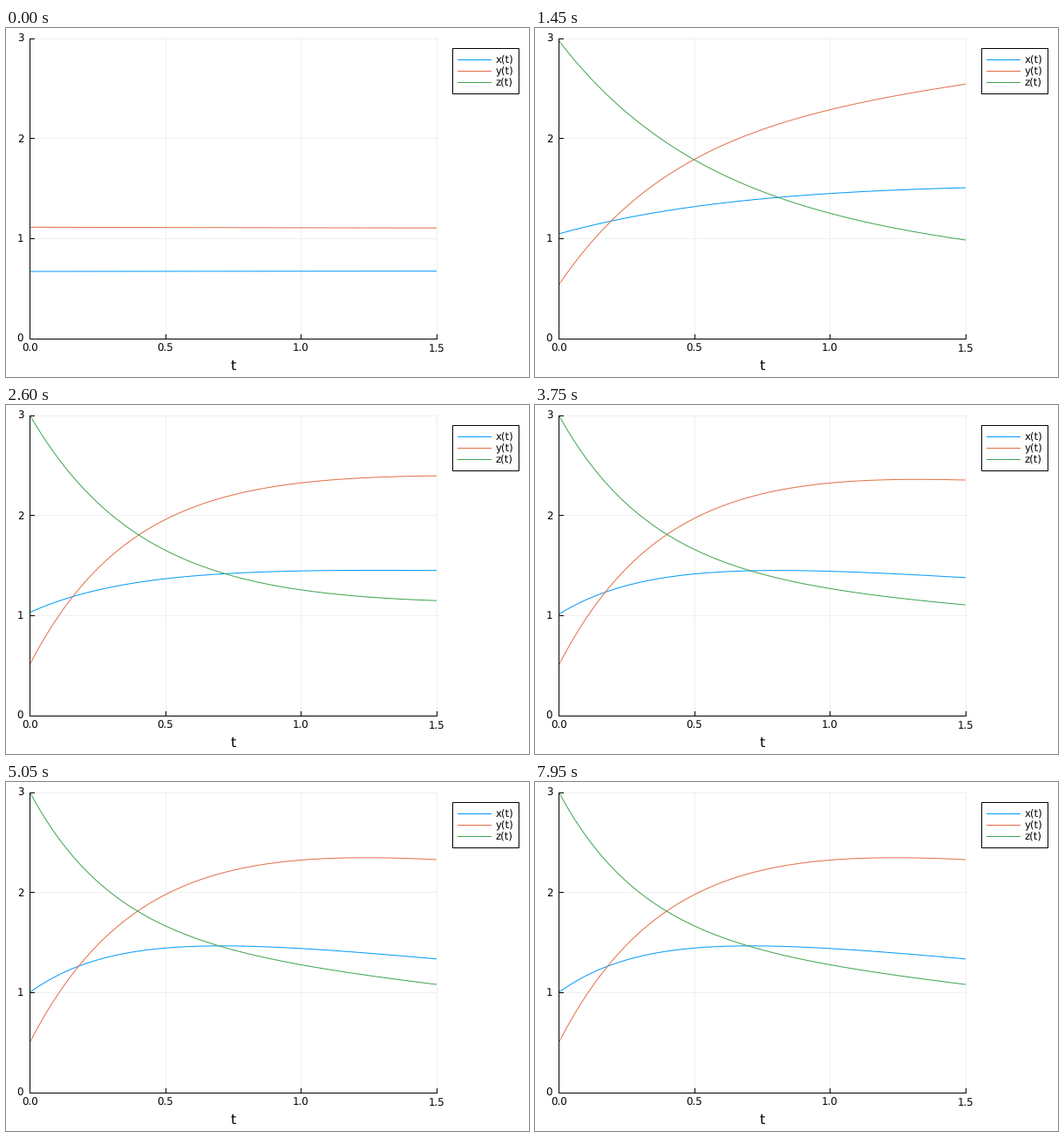
Write a matplotlib script that moves like this. It is 600 by 400 pixels and loops after 8000 ms.

```python
import numpy as np
import matplotlib.pyplot as plt
from matplotlib.animation import FuncAnimation
from matplotlib.patches import Rectangle

W, H, DPI = 600, 400, 100
FRAMES, STEP_MS = 160, 50
PX = 72 / DPI                      # one pixel in points
LEFT, RIGHT, TOP, BOTTOM = 27.4, 493.8, 11.8, 355.7
COLORS = ["#009AFA", "#E36F47", "#3EA44E"]
NAMES = ["x(t)", "y(t)", "z(t)"]

plt.rcParams["font.family"] = "DejaVu Sans"
plt.rcParams["text.hinting"] = "none"

T = np.linspace(0, 1.5, 151)


def relax(start, mid, end, rate):
    """a + b t + c exp(-rate t) through the values at t = 0, 0.5 and 1.5."""
    def terms(t):
        return np.stack([np.ones_like(t), t, np.exp(-rate * t)], axis=1)
    coef = np.linalg.solve(terms(np.array([0, 0.5, 1.5])), [start, mid, end])
    return terms(T) @ coef


# The fit: flat guess, rough shape, better shape, settled shape
GUESS = np.array([0.669 + 0.002 * T, 1.111 - 0.005 * T, 1.1 + 0 * T])
ROUGH = np.array([relax(1.045, 1.317, 1.506, 1.3),
                  relax(0.535, 1.790, 2.541, 2.3),
                  relax(2.975, 1.785, 0.983, 1.8)])
BETTER = np.array([relax(1.03, 1.366, 1.448, 2.5),
                   relax(0.51, 1.958, 2.395, 2.6),
                   relax(3.00, 1.650, 1.147, 2.4)])
SETTLED = np.array([relax(1.0, 1.443, 1.334, 3.0),
                    relax(0.5, 1.977, 2.327, 2.4),
                    relax(3.0, 1.664, 1.079, 3.2)])
ROUGH_AT, BETTER_AT, SETTLED_AT = 29, 52, 100


def blend(a, b, u):
    return a + (b - a) * u


def curves(frame):
    """Values of x, y and z over T."""
    if frame < ROUGH_AT:
        return blend(GUESS, ROUGH, (frame / ROUGH_AT) ** 0.45)
    if frame < BETTER_AT:
        return blend(ROUGH, BETTER, (frame - ROUGH_AT) / (BETTER_AT - ROUGH_AT))
    u = min(1, (frame - BETTER_AT) / (SETTLED_AT - BETTER_AT))
    return blend(BETTER, SETTLED, 1 - (1 - u) ** 1.5)


def px(t):
    return LEFT + (RIGHT - LEFT) * t / 1.5


def py(v):
    return BOTTOM - (BOTTOM - TOP) * v / 3


fig = plt.figure(figsize=(W / DPI, H / DPI), dpi=DPI, facecolor="white")
ax = fig.add_axes([0, 0, 1, 1])
ax.set_xlim(0, W)
ax.set_ylim(H, 0)
ax.axis("off")


def stroke(xs, ys, color="black", **kw):
    return ax.plot(xs, ys, color=color, lw=PX, **kw)[0]


def label(x, y, text, size=8.5, ha="center"):
    ax.text(x, y, text, fontsize=size, ha=ha, va="baseline", color="black")


for t in (0, 0.5, 1.0, 1.5):
    x = px(t)
    stroke([x, x], [TOP, BOTTOM], alpha=0.06, zorder=1)
    stroke([x, x], [BOTTOM, BOTTOM - 4.5], zorder=4)
    label(x, 371.3, f"{t:.1f}")
for v in range(4):
    y = py(v)
    stroke([LEFT, RIGHT], [y, y], alpha=0.06, zorder=1)
    stroke([LEFT, LEFT + 4.5], [y, y], zorder=4)
    label(20.2, y + 4.3, str(v), ha="right")
stroke([LEFT, LEFT], [TOP, BOTTOM], zorder=4)
stroke([LEFT, RIGHT], [BOTTOM, BOTTOM], zorder=4)
label(260.6, 391.6, "t", size=11.5)

ax.add_patch(Rectangle((512.4, 22.8), 75.8, 52, fc="white", ec="black", lw=PX))
for k, (name, color) in enumerate(zip(NAMES, COLORS)):
    y = 35.7 + 12.9 * k
    stroke([518.3, 556.2], [y, y], color)
    label(561.8, y + 4.2, name, ha="left")

frame_box = Rectangle((LEFT, TOP), RIGHT - LEFT, BOTTOM - TOP, transform=ax.transData)
lines = [stroke([], [], c, zorder=3) for c in COLORS]
for line in lines:
    line.set_clip_path(frame_box)


def draw(frame):
    for line, values in zip(lines, curves(frame)):
        line.set_data(px(T), py(values))
    lines[2].set_visible(frame > 0)    # z starts out of view
    return lines


anim = FuncAnimation(fig, draw, frames=FRAMES, interval=STEP_MS,
                     init_func=lambda: draw(0), repeat=True, repeat_delay=0)
plt.show()
```
